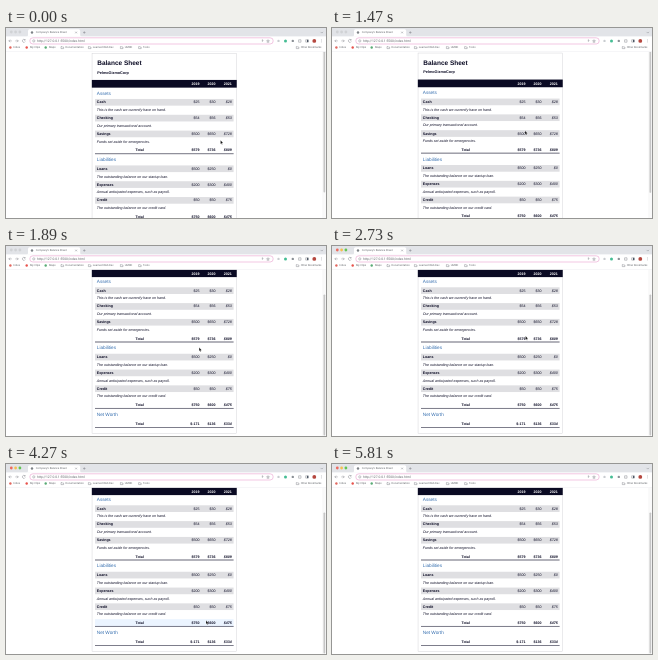
An HTML page that plays this animation: 320x190 px, repeating every 6930 ms.

```html
<!DOCTYPE html>
<html lang="en">
<head>
<meta charset="utf-8">
<title>Balance Sheet</title>
<style>
  html, body { margin: 0; width: 100%; height: 100%; overflow: hidden; background: #fff; }
  svg { display: block; width: 320px; height: 190px; }
  text { font-family: "Liberation Sans", Arial, sans-serif; text-rendering: geometricPrecision; white-space: pre; }
  .b { font-weight: bold; }
  .i { font-style: italic; }
  .bi { font-weight: bold; font-style: italic; }
  .ui { font-family: Roboto, sans-serif; }
  .line { fill: none; stroke: #7d8186; stroke-width: .45; }
</style>
</head>
<body>
<svg viewBox="0 0 320 190">
  <defs><clipPath id="view"><rect y="23.4" width="320" height="166.6"/></clipPath></defs>
  <rect width="320" height="190" fill="#fff"/>
  <g clip-path="url(#view)">
    <g transform="translate(0 23.4) scale(.225 .2265)">
      <g id="page"></g>
      <g id="years"></g>
    </g>
    <rect x="316.7" y="23" width="3.3" height="167" fill="#fafafa"/>
    <path d="M316.7 23V190" stroke="#e8e8e8" stroke-width=".25"/>
    <rect id="thumb" x="317.5" width="1.7" height="141" rx=".85" fill="#c6c6c6"/>
  </g>
  <g id="chrome" transform="translate(0 -.5)"></g>
  <path id="cursor" d="M0 0V3.7L.85 2.95 1.4 4.2 2 3.95 1.45 2.7H2.6Z" fill="#000" stroke="#fff" stroke-width=".25"/>
</svg>
<script>
const LOOP = 6930, INK = '#0a0a23';
const VIEW_TOP = 23.4, SCROLL_MAX = 131, YEARS_Y = 126, TABLE_STEP = 293.4, FOCUS_AT = 2240;
const LEFT = 395.5, WIDTH = 616, COLS = [859.5, 931.5, 1003.5];
const LIGHTS = ['#ed6a5e', '#f5bf4f', '#61c554'];
const el = id => document.getElementById(id);

// y is the middle of the text line
const text = (x, y, s, size, cls = '', fill = INK, anchor = 'start') =>
  `<text x="${x}" y="${y + size * .3465}" font-size="${size}" class="${cls}" fill="${fill}" text-anchor="${anchor}">${s}</text>`;
const rect = (x, y, w, h, fill, extra = '') =>
  `<rect x="${x}" y="${y}" width="${w}" height="${h}" fill="${fill}" ${extra}/>`;
const dot = (x, y, r, fill, extra = '') => `<circle cx="${x}" cy="${y}" r="${r}" fill="${fill}" ${extra}/>`;

const values = (y, list, cls, lastCls) => list.map((v, i) =>
  text(COLS[i], y, '$' + v, 16, i === 2 ? lastCls : cls, INK, 'end')).join('');

const tables = [
  ['Assets', [
    ['Cash', 'This is the cash we currently have on hand.', [25, 30, 28]],
    ['Checking', 'Our primary transactional account.', [54, 56, 53]],
    ['Savings', 'Funds set aside for emergencies.', [500, 650, 728]]
  ], [579, 736, 809]],
  ['Liabilities', [
    ['Loans', 'The outstanding balance on our startup loan.', [500, 250, 0]],
    ['Expenses', 'Annual anticipated expenses, such as payroll.', [200, 300, 400]],
    ['Credit', 'The outstanding balance on our credit card.', [50, 50, 75]]
  ], [750, 600, 475]],
  ['Net Worth', [], [-171, 136, 334]]
];

function tableMarkup([caption, rows, total], n) {
  let y = 210 + n * TABLE_STEP;
  let out = text(LEFT + 8, y - 26, caption, 20.8, '', '#356eaf');
  for (const [name, note, nums] of rows) {
    out += rect(LEFT, y, WIDTH, 29.5, '#dfdfe2')
      + text(LEFT + 8, y + 13.8, name, 16, 'b')
      + values(y + 13.8, nums, '', 'i')
      + text(LEFT + 8, y + 47.8, note, 16, 'i');
    y += 69.8;
  }
  return out + rect(LEFT, y, WIDTH, 32, '#99c9ff', `id="hover${n}" opacity="0"`)
    + text(594, y + 16.5, 'Total', 16, 'b', INK, 'middle')
    + values(y + 16, total, 'b', 'bi')
    + rect(LEFT, y + 30, WIDTH, 1.4, INK) + rect(LEFT, y + 32.7, WIDTH, 1.4, INK);
}

el('page').innerHTML =
  rect(382.5, 9, 642, 847, '#fff', 'stroke="#d0d0d5" stroke-width="2"')
  + text(405.5, 50.5, 'Balance Sheet', 28.8, 'b')
  + text(405.5, 92.5, 'PelmoGizmoCorp', 16.8, 'b')
  + tables.map(tableMarkup).join('');

el('years').innerHTML = rect(381.5, 0, 644, 34, INK)
  + COLS.map((x, i) => text(x, 17, 2019 + i, 16, 'b', '#fff', 'end')).join('');

function chromeMarkup() {
  const grey = '#7d8186', ink = '#606469';
  const line = d => `<path class="line" d="${d}"/>`;
  const label = (x, y, s, size = 2.7) => text(x, y, s, size, 'ui', ink);
  const folder = (x, y) => line(`M${x - 1.2} ${y - .9}h1l.4 .4h1.2v1.6h-2.6z`);
  let out = rect(0, 0, 320, 9.2, '#e2e4e8') + rect(0, 9, 320, 15, '#fff')
    + '<path d="M20.5 9.2Q22 9.2 22 7.6V3.4Q22 1.8 23.6 1.8H72.6Q74.2 1.8 74.2 3.4V7.6Q74.2 9.2 75.7 9.2Z" fill="#fff"/>';
  LIGHTS.forEach((c, i) => out += dot(5.3 + i * 4.3, 4.5, 1.4, c, `id="light${i}"`));
  out += dot(26, 5, 1.2, grey) + label(29.8, 5, 'Company’s Balance Sheet')
    + line('M69.3 4.2l1.6 1.6m0-1.6l-1.6 1.6M77 5h2.6m-1.3-1.3v2.6M314.6 4.4l1.2 1.2 1.2-1.2');

  // toolbar
  out += line('M5.8 13.4H2.8m1.3-1.3l-1.3 1.3 1.3 1.3M9.3 13.4h3m-1.3-1.3l1.3 1.3-1.3 1.3M19 12.4a1.5 1.5 0 1 0 .2 1.6M19.2 11.6v1.1h-1.1')
    + rect(23.8, 10.3, 243.4, 6.2, '#fff', 'rx="3.1" stroke="#e58fc4" stroke-width=".5"')
    + `<circle class="line" cx="27.8" cy="13.4" r="1.1"/>`
    + label(31, 13.4, 'http://127.0.0.1:5500/index.html', 3.3)
    + line('M256.5 14.3v-2m-.8 .8l.8-.8 .8 .8M262 12.2l.4 .9 1 .1-.7 .7 .2 1-.9-.5-.9 .5 .2-1-.7-.7 1-.1z')
    + dot(272.5, 13.4, 1.2, '#c9ccd0') + dot(279.5, 13.4, 1.5, '#45bd94')
    + dot(286.8, 13.4, 1.2, '#8b9096')
    + line('M292.6 12.3h2.4v2.4h-2.4z') + line('M299.7 12.3h2.6v2.3h-2.6z') + rect(301, 12.3, 1.3, 2.3, '#4b5563')
    + dot(308.3, 13.4, 1.9, '#b5473f');
  for (const y of [12.3, 13.4, 14.5]) out += dot(315.3, y, .35, grey);

  // bookmarks
  out += dot(4.4, 20, 1.2, '#e2685f') + label(7.6, 20, 'Inbox')
    + dot(20.7, 20, 1.2, '#e8524c') + label(24, 20, 'My Clips')
    + dot(39.7, 20, 1.2, '#5aab76') + label(43, 20, 'Maps');
  for (const [x, s] of [[56.2, 'Documentation'], [83.6, 'Learned Web Dev'], [115.6, 'UMRD'], [133.8, 'Tools'], [291.5, 'Other Bookmarks']])
    out += folder(x, 20) + label(x + 3.2, 20, s);
  return out + rect(0, 23.7, 320, .3, '#e0e2e6');
}
el('chrome').innerHTML = chromeMarkup();

// keys: [time, value...], linear in between
function track(keys, t) {
  let k = 0;
  while (k < keys.length - 1 && keys[k + 1][0] <= t) k++;
  const a = keys[k], b = keys[k + 1] || a;
  const p = b === a || t < a[0] ? 0 : (t - a[0]) / (b[0] - a[0]);
  return a.slice(1).map((v, i) => v + (b[i + 1] - v) * p);
}

const scrollKeys = [[0, 0], [1400, 0], [1470, 1], [1540, 55], [1610, 103], [1680, SCROLL_MAX]];
const cursorKeys = [
  [0, 214.5, 112.2], [70, 214.5, 112.2], [700, 206, 108.5], [1050, 193, 102.8], [1820, 193, 102.8],
  [2100, 193.5, 97.5], [2240, 193.5, 97.5], [2730, 193.5, 90], [3430, 193.5, 90], [3640, 194, 101.8],
  [4130, 200, 156.5], [5040, 200, 156.5], [5670, 200, 179], [5810, 200, 191]
];
const hoverKeys = [
  [[0, 0], [2960, 0], [3290, 1], [3450, 1], [3640, 0]],
  [[0, 0], [4150, 0], [4760, 1], [5000, 1], [5250, 0]],
  [[0, 0], [5320, 0], [5670, 1], [5810, 0]]
];

function draw(t) {
  const [scroll] = track(scrollKeys, t);
  el('page').setAttribute('transform', `translate(0 ${-scroll})`);
  el('years').setAttribute('transform', `translate(0 ${Math.max(0, YEARS_Y - scroll)})`);
  el('thumb').setAttribute('y', VIEW_TOP + 25 * scroll / SCROLL_MAX);
  const [x, y] = track(cursorKeys, t);
  el('cursor').setAttribute('transform', `translate(${x} ${y})`);
  hoverKeys.forEach((keys, n) => el('hover' + n).setAttribute('opacity', track(keys, t)[0]));
  // window buttons stay grey until the window gets focus
  LIGHTS.forEach((c, i) => el('light' + i).setAttribute('fill', t < FOCUS_AT ? '#d0d2d5' : c));
}

const start = performance.now();
function tick() {
  draw((performance.now() - start) % LOOP);
  requestAnimationFrame(tick);
}
draw(0);
requestAnimationFrame(tick);
</script>
</body>
</html>
```
